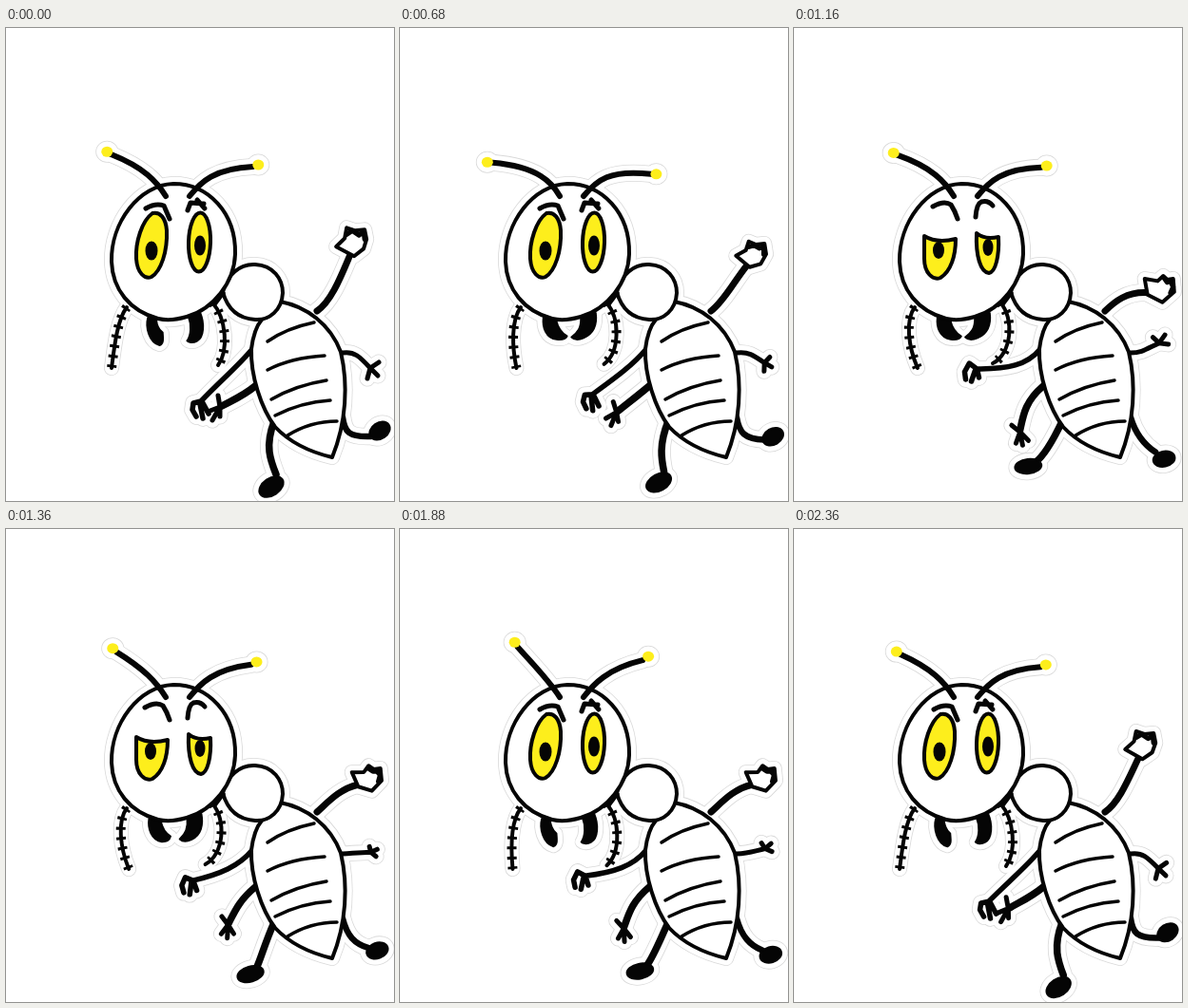
Recreate the animation shown at these times as an HTML page with a canvas. Size 408 by 498 pixels, loop 2400 ms.

```html
<!DOCTYPE html>
<html lang="en">
<head>
<meta charset="utf-8">
<title>Termite</title>
<style>
  html, body { margin: 0; width: 100%; height: 100%; overflow: hidden; background: #fff; }
  canvas { display: block; }
</style>
</head>
<body>
<canvas id="stage" width="408" height="498"></canvas>
<script>
const ctx = document.getElementById('stage').getContext('2d');
const LOOP = 2400, STRIDE = 800, STEP = 40, MARGIN = 5.2;
const BLACK = '#050505', YELLOW = '#fdee1c', EDGE = '#d9d9d9';
let parts;

const mix = (a, b, k) => a + (b - a) * k;
const wave = (t, period, shift = 0) => (1 - Math.cos((t - shift) / period * 2 * Math.PI)) / 2;

// Blends two path strings that share the same commands.
function blend(a, b, k) {
  const ends = b.match(/[\d.]+/g);
  let i = 0;
  return a.replace(/[\d.]+/g, n => mix(+n, +ends[i++], k).toFixed(2));
}

function add(path, width, fill, dash) {
  parts.push({ path: typeof path === 'string' ? new Path2D(path) : path, width, fill, dash });
}

function oval(x, y, rx, ry, tilt, width, fill) {
  const path = new Path2D();
  path.ellipse(x, y, rx, ry, tilt, 0, 7);
  add(path, width, fill);
}

function raisedArm(k) {
  add(blend('M327 298C342 288 352 262 362 238', 'M327 298C337 288 350 278 373 281', k), 7);
  add(blend('M366 240L347 230L356 221L358 210L367 213L377 212L379 222L376 232Z',
            'M372 283L370 266L384 269L390 264L394 268L400 267L401 281L388 292Z', k), 4, '#fff');
  add(blend('M358 217L364 213L371 218L376 214L377 222', 'M391 266L394 271L397 269L400 276L397 282', k), 5);
}

function limbs(k) {
  const limb = (a, b, width) => add(blend(a, b, k), width);
  const foot = (a, b) => oval(...a.map((v, i) => mix(v, b[i], k)), 2, BLACK);

  // Small arm
  limb('M354 342C366 340 372 346 383 358L392 352M383 358L391 366M383 358L380 369',
       'M354 342C366 342 370 338 384 331L377 325M384 331L390 322M384 331L394 332', 5);
  // Front arms
  limb('M259 338C245 355 225 372 205 393L197 395L196 402L200 409M204 396L207 411M206 393L213 406',
       'M259 338C245 355 225 359 192 358L184 352L179 361L180 369M190 360L186 371M192 358L194 367', 5.5);
  limb('M262 377C250 387 240 391 225 399L223 387M225 399L212 404M225 399L217 413M225 399L225 409',
       'M262 377C243 393 241 408 238 426L229 419M238 426L234 438M238 426L241 440M238 426L247 435', 5);
  limb('M262 377C250 387 240 391 227 398', 'M262 377C243 393 241 408 238 424', 7.5);
  // Legs
  limb('M282 414C272 440 278 455 284 470', 'M282 414C272 435 263 450 253 457', 7.5);
  foot([279, 483, 14, 9, -.6], [245.5, 461, 14, 7.5, -.1]);
  limb('M354 410C356 425 360 431 384 430', 'M354 410C360 430 370 440 380 447', 6.5);
  foot([393, 424, 11.5, 8.5, -.6], [389, 454.5, 11.5, 8, -.2]);
}

function body() {
  add('M288 288C316 293 341 312 352 341C360 375 358 415 343 452C322 447 300 438 283 420' +
      'C268 400 257 365 258 338C260 322 263 314 269 307Z', 4, '#fff');
  add('M275 330Q295 316 324 310M275 360Q300 347 335 345M279 391Q305 376 337 371' +
      'M283 408Q310 394 341 392M296 429Q320 414 348 414', 3.5);
  add('M228 278C232 260 246 248 262 249C281 250 291 264 291 279C290 297 277 308 262 307' +
      'C245 306 233 296 228 278Z', 4, '#fff');
  add('M220 291L229 279', 3.5);
}

function jaws(k) {
  add(blend('M149 305C146 315 150 332 161 335C165 333 164 328 163 320C159 317 157 310 157 306Z',
            'M151 305C150 315 154 326 165 327C171 328 175 328 177 325C170 321 167 316 165 308Z', k), 2, BLACK);
  add(blend('M204 300C209 311 209 326 202 330C197 333 193 331 192 330C196 324 196 312 192 303Z',
            'M206 300C207 311 204 321 192 326C187 328 182 328 179 325C186 320 190 316 190 306Z', k), 2, BLACK);
}

function palps(k) {
  const sides = [
    ['M127 294C117 307 114 335 111 358', 'M127 294C117 307 120 335 130 358'],
    ['M217 289C232 306 234 340 223 355', 'M217 289C232 306 229 343 209 353']
  ];
  for (const [a, b] of sides) {
    const path = blend(a, b, k);
    add(path, 4);
    add(path, 10, null, [3, 7.5]);
  }
}

function head() {
  add('M176 164C213 164 242 195 241 238C240 268 218 296 190 304C180 307 168 308 160 306' +
      'C130 298 112 275 111 246C110 205 140 165 176 164Z', 4, '#fff');
}

function face(sleepy) {
  if (sleepy) {
    add('M137 219Q150 227 170 222C170 240 165 256 154 263C146 266 137 258 137 243Z', 4, YELLOW);
    add('M192 216Q200 223 215 220C216 240 212 257 205 258C196 257 191 240 192 216Z', 4, YELLOW);
    oval(152, 234, 5, 8, 0, 2, BLACK);
    oval(204, 231, 4.5, 8, 0, 2, BLACK);
    add('M146 188Q158 181 165 186Q169 192 172 201M191 199Q192 185 197 183Q204 181 209 187', 5);
  } else {
    add('M154 195C143 203 136 225 137 243C138 258 146 265 153 262C163 256 170 235 169 213' +
        'C168 200 162 193 154 195Z', 4, YELLOW);
    oval(203.5, 225.5, 11.5, 31, .03, 4, YELLOW);
    oval(153, 234.5, 5.5, 9, 0, 2, BLACK);
    oval(204, 229, 5, 9.5, 0, 2, BLACK);
    add('M147 190Q157 184 166 187L172 201M191 192L194 184L208 185M201 181L209 190', 5);
  }
}

function antennae(k) {
  add(blend('M168 177C160 163 146 146 97 142', 'M168 177C157 160 145 148 124 124', k), 6);
  add(blend('M193 177C207 160 220 149 264 154', 'M193 177C203 164 218 147 255 138', k), 6);
  for (const [x, y, x2, y2] of [[91.5, 141.5, 121, 119], [269.5, 154, 261, 134]]) {
    oval(mix(x, x2, k), mix(y, y2, k), 6, 5.5, 0, 0, YELLOW);
  }
}

function halo(color, grow) {
  ctx.strokeStyle = ctx.fillStyle = color;
  ctx.setLineDash([]);
  for (const { path, width, fill, dash } of parts) {
    if (dash) continue;
    ctx.lineWidth = width + grow * 2;
    ctx.stroke(path);
    if (fill) ctx.fill(path);
  }
}

function draw(now) {
  const t = Math.floor(now % LOOP / STEP) * STEP;
  parts = [];
  raisedArm(wave(t, STRIDE, 20));
  limbs(wave(t, STRIDE));
  body();
  jaws(wave(t, LOOP, 2130));
  palps(wave(t, LOOP));
  head();
  face(t >= 1000 && t < 1400);
  antennae(wave(t, LOOP, 600));

  ctx.fillStyle = '#fff';
  ctx.fillRect(0, 0, 408, 498);
  ctx.lineJoin = ctx.lineCap = 'round';
  halo(EDGE, MARGIN + .8);
  halo('#fff', MARGIN);
  for (const { path, width, fill, dash } of parts) {
    ctx.setLineDash(dash || []);
    ctx.lineCap = dash ? 'butt' : 'round';
    ctx.strokeStyle = BLACK;
    ctx.lineWidth = width;
    if (fill) {
      ctx.fillStyle = fill;
      ctx.fill(path);
    }
    if (width) ctx.stroke(path);
  }
  requestAnimationFrame(draw);
}
requestAnimationFrame(draw);
</script>
</body>
</html>
```
